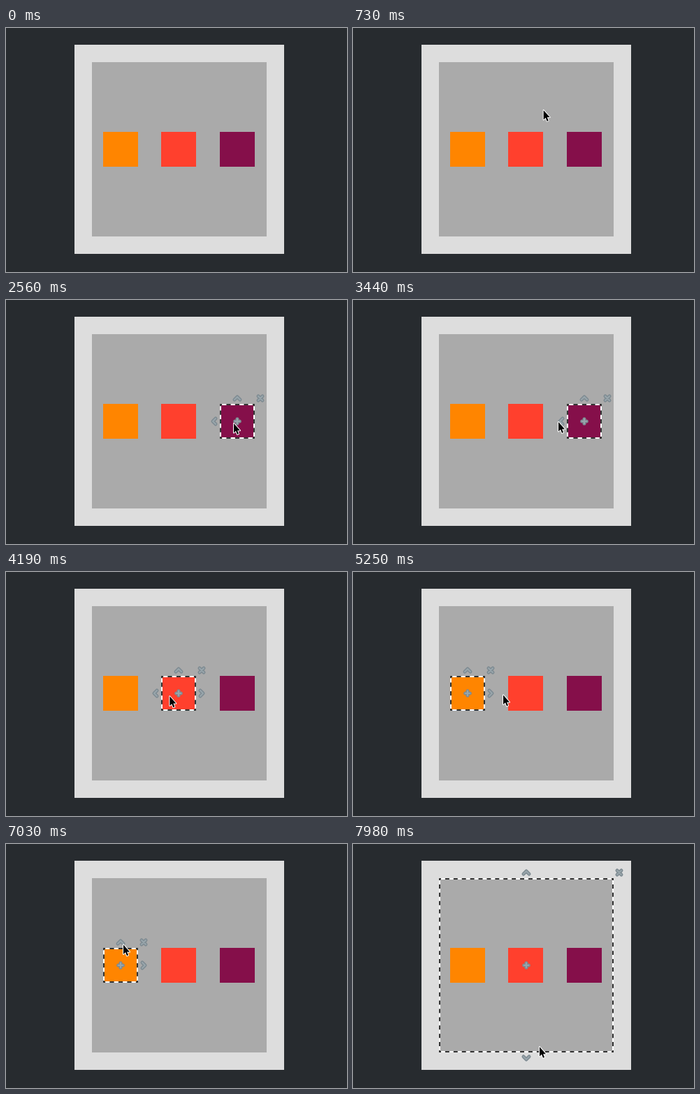
Write an HTML page with a canvas that moves like this. It is 488 by 350 pixels and loops after 8 s.

```html
<!DOCTYPE html>
<html>
<head>
<meta charset="utf-8">
<style>
html, body { margin: 0; width: 100%; height: 100%; overflow: hidden; background: #272b2f; }
canvas { display: block; }
</style>
</head>
<body>
<canvas id="stage" width="488" height="350"></canvas>
<script>
const ctx = document.getElementById('stage').getContext('2d');
const LOOP = 8000;
const STEP = 58; // time between pointer positions

const panel = { x: 123, y: 49, size: 250, color: '#aaa', arrows: 'ud' };
const [orange, red, purple] = ['#ff8500', '#ff402d', '#850f4a'].map((color, i) => ({
  x: Math.round(139 + i * 83.4), y: 149, size: 50, color, arrows: ['ur', 'ulr', 'ul'][i]
}));

const clicks = [
  { at: 2560, box: purple },
  { at: 3850, box: red },
  { at: 5250, box: orange },
  { at: 7270, box: panel }
];

// Each move eases to a point, along a curve when it has a bend.
const start = [247, 350];
const moves = [
  { at: 500, steps: 13, to: [335, 164], bend: [245, -10] },
  { at: 2080, steps: 3, to: [325, 176] },
  { at: 2860, steps: 5, to: [289, 174] },
  { at: 3380, steps: 4, to: [295, 174] },
  { at: 4030, steps: 8, to: [203, 179] },
  { at: 4600, steps: 7, to: [214, 175.5] },
  { at: 5610, steps: 10, to: [178, 177] },
  { at: 6500, steps: 7, to: [168, 145] },
  { at: 7030, steps: 1, to: [167, 143.5] },
  { at: 7510, steps: 9, to: [266, 290], bend: [168, 136] }
];

function pointerAt(t) {
  let pos = start;
  for (const { at, steps, to, bend } of moves) {
    if (t < at) break;
    const p = Math.min(1, Math.floor((t - at) / STEP + 1.25) / steps);
    const u = 1 - (1 - p) ** 1.6;
    pos = pos.map((from, i) => {
      const mid = bend ? bend[i] : (from + to[i]) / 2;
      return from * (1 - u) ** 2 + 2 * mid * u * (1 - u) + to[i] * u * u;
    });
  }
  return pos;
}

function square({ x, y, size, color }) {
  ctx.fillStyle = color;
  ctx.fillRect(x, y, size, size);
}

function dashedFrame({ x, y, size }) {
  const dash = size / Math.round(size / 12) / 2;
  ctx.lineWidth = 2;
  ctx.strokeStyle = '#fff';
  ctx.strokeRect(x + 1, y + 1, size - 2, size - 2);
  ctx.strokeStyle = '#333';
  ctx.setLineDash([dash, dash]);
  ctx.lineDashOffset = dash / 2; // half a dash at every corner
  ctx.beginPath();
  for (const d of [1, size - 1]) {
    ctx.moveTo(x, y + d);
    ctx.lineTo(x + size, y + d);
    ctx.moveTo(x + d, y);
    ctx.lineTo(x + d, y + size);
  }
  ctx.stroke();
  ctx.setLineDash([]);
}

const chevron = new Path2D('M-4 2L0 -2L4 2');
const plus = new Path2D('M-3.3 0H3.3M0 -3.3V3.3');
const cross = new Path2D('M-3 -3L3 3M3 -3L-3 3');
const arrow = new Path2D('M1 1V14.5L4 11.8L6 16.8L8 16L6.1 11.2H10Z');

function icon(shape, x, y, angle = 0) {
  ctx.save();
  ctx.translate(x, y);
  ctx.rotate(angle);
  ctx.lineJoin = ctx.lineCap = 'round';
  for (const [width, color] of [[5, '#7d8a91'], [2.2, '#98a5ab']]) {
    ctx.lineWidth = width;
    ctx.strokeStyle = color;
    ctx.stroke(shape);
  }
  ctx.restore();
}

function handles({ x, y, size, arrows }) {
  const cx = x + size / 2, cy = y + size / 2, out = size / 2 + 8;
  for (const a of arrows) {
    const angle = 'urdl'.indexOf(a) * Math.PI / 2;
    icon(chevron, cx + Math.sin(angle) * out, cy - Math.cos(angle) * out, angle);
  }
  icon(cross, cx + out, cy - out);
  icon(plus, cx, cy);
}

function pointer([x, y]) {
  ctx.save();
  ctx.translate(x, y);
  ctx.lineJoin = 'round';
  ctx.lineWidth = 2;
  ctx.strokeStyle = '#fff';
  ctx.stroke(arrow);
  ctx.fillStyle = '#000';
  ctx.fill(arrow);
  ctx.restore();
}

function draw(t) {
  ctx.fillStyle = '#272b2f';
  ctx.fillRect(0, 0, 488, 350);
  [{ x: 98, y: 24, size: 300, color: '#ddd' }, panel, orange, red, purple].forEach(square);

  const click = clicks.filter(({ at }) => t >= at).pop();
  if (click) {
    dashedFrame(click.box);
    handles(click.box);
  }
  pointer(pointerAt(t));
}

const begin = performance.now();
function tick() {
  draw((performance.now() - begin) % LOOP);
  requestAnimationFrame(tick);
}
tick();
</script>
</body>
</html>
```
